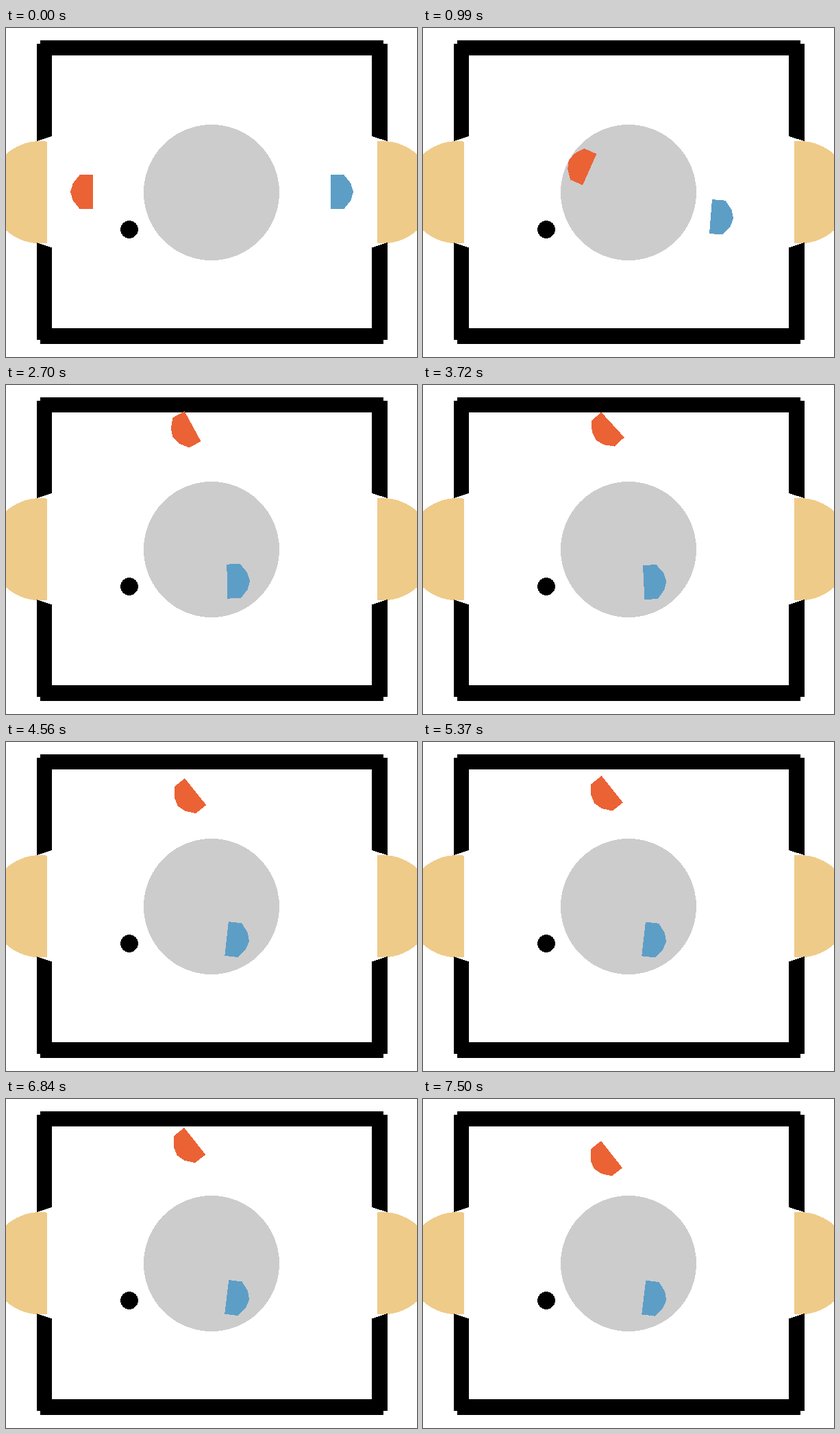
An HTML page for the animation above (7530 ms loop, 600x480 px).

```html
<!DOCTYPE html>
<html>
<head>
<meta charset="utf-8">
<style>
  html, body { margin: 0; width: 100%; height: 100%; overflow: hidden; background: #fff; }
  svg { display: block; }
</style>
</head>
<body>
<svg width="600" height="480" viewBox="0 0 600 480" shape-rendering="crispEdges">
  <circle cx="300" cy="240" r="99" fill="#ccc"/>
  <g fill="#efcb8a">
    <circle cx="50" cy="239.7" r="74.7"/>
    <circle cx="550" cy="239.7" r="74.7"/>
  </g>
  <path fill="#fff" d="M60 160H201V320H60zM399 160H542V320H399z"/>
  <path d="M50 18H551V40H50z"/>
  <path d="M50 438H551V461H50z"/>
  <path d="M45 23H67V158L45 165zM45 455H67V320.5L45 313z"/>
  <path d="M557 23H534V158L557 165zM557 455H534V320.5L557 313z"/>
  <circle cx="180" cy="294" r="12.8"/>
  <defs>
    <path id="racket" stroke-width="2" d="M-12 -24H6V24H-12L-21.6 12L-25.2 0L-21.6 -12z"/>
  </defs>
  <g id="orange"><use href="#racket" fill="#eb6235" stroke="#eb6235"/></g>
  <g id="blue"><use href="#racket" transform="scale(-1 1)" fill="#5d9ec7" stroke="#5d9ec7"/></g>
</svg>
<script>
const LOOP = 7530, STEP = 30;

// Key poses: time, x, y, angle in degrees
const orangeKeys = [
  [0, 120.2, 239.2, 0],
  [990, 236.8, 203.7, 24],
  [1950, 268, 197, 4.7],
  [2500, 266, 64, -24],       // reaches the top wall
  [3720, 271.8, 62.7, -42.5],
  [3900, 271.6, 75, -39],     // lets go and hovers
  [7500, 270, 81, -38.3]
];
const blueKeys = [
  [0, 480.8, 239.2, 0],
  [700, 506, 266, 2],         // backs up to the goal line
  [990, 427, 275.6, 4.6],
  [1350, 332, 282, 3],        // stops at the centre line
  [3720, 329.2, 287.7, -2.9],
  [4560, 329, 287.8, 6.3],
  [7500, 329.2, 290.4, 7]
];

// Monotone cubic through the keys, so poses never overshoot
function pose(keys, t) {
  const i = Math.max(0, keys.findIndex(key => key[0] > t) - 1);
  const a = keys[i], b = keys[i + 1];
  const h = b[0] - a[0], u = (t - a[0]) / h, v = 1 - u;
  return [1, 2, 3].map(k => {
    const slope = j => (keys[j + 1][k] - keys[j][k]) / (keys[j + 1][0] - keys[j][0]);
    const tangent = j => {
      const m = slope(Math.max(j - 1, 0)), n = slope(Math.min(j, keys.length - 2));
      return m * n > 0 ? 2 * m * n / (m + n) : 0;
    };
    return a[k] * v * v * (1 + 2 * u) + b[k] * u * u * (3 - 2 * u)
      + h * u * v * (tangent(i) * v - tangent(i + 1) * u);
  });
}

// Hovering grows to a steady bob
function bob(t) {
  const size = Math.min(15, Math.max(0, t - 3720) / 150);
  return size * Math.cos(2 * Math.PI * (t - 5990) / 1900);
}

function place(id, [x, y, angle], lift = 0) {
  document.getElementById(id)
    .setAttribute("transform", `translate(${x} ${y + lift}) rotate(${angle})`);
}

const start = performance.now();
function draw() {
  const now = Math.floor((performance.now() - start) % LOOP / STEP) * STEP;
  const t = Math.min(now, LOOP - STEP - 1);
  place("orange", pose(orangeKeys, t), bob(t));
  place("blue", pose(blueKeys, t));
  requestAnimationFrame(draw);
}
draw();
</script>
</body>
</html>
```
